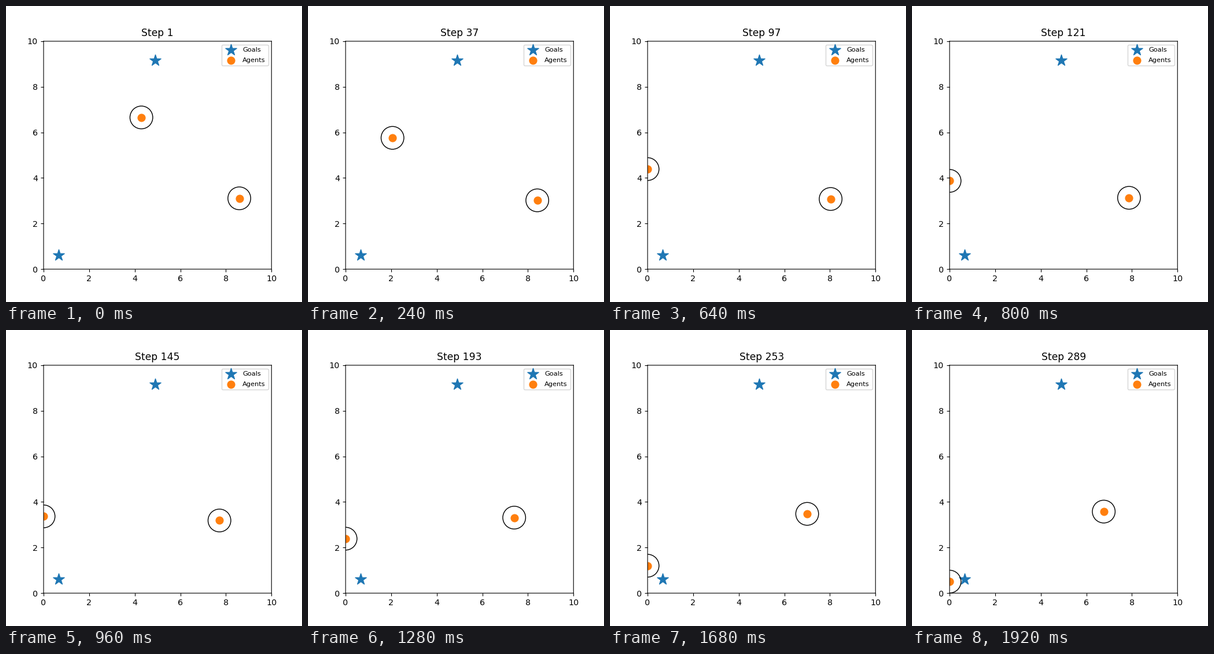
A matplotlib script for the animation above (2 s loop, 512x512 px).

```python
import numpy as np
import matplotlib.pyplot as plt
from matplotlib.animation import FuncAnimation
from matplotlib.patches import Circle

SIZE, SIDE = 512, 394.24
FRAMES, INTERVAL, STRIDE = 25, 80, 12


def drift(t, start, speed, kick, tau):
    """Steady motion plus an initial kick that fades with time constant tau."""
    return start + speed * t + kick * (1 - np.exp(-t / tau))


def positions(t):
    # The left agent runs into the wall and slides down along it
    left = max(0.0, 4.29 - 0.744 * t), drift(t, 6.656, -0.2233, -0.87, 10)
    right = drift(t, 8.587, -0.0793, 0.08, 2), drift(t, 3.107, 0.0335, -0.333, 3.6)
    return [left, right]


fig = plt.figure(figsize=(5, 5), dpi=SIZE / 5)
ax = fig.add_axes([65.02 / SIZE, 56.83 / SIZE, SIDE / SIZE, SIDE / SIZE])
ax.set(xlim=(0, 10), ylim=(0, 10))
for spine in ax.spines.values():
    spine.set_snap(False)

ax.scatter([4.905, 0.655], [9.16, 0.605], s=200, marker="*", label="Goals")
agents = ax.scatter(*zip(*positions(0)), s=80, label="Agents")
rings = [ax.add_patch(Circle(p, 0.5, fill=False)) for p in positions(0)]
title = ax.set_title("Step 1")
ax.legend(loc="upper right", fontsize=8, labelspacing=0.65)


def update(i):
    spots = positions(i)
    agents.set_offsets(spots)
    for ring, spot in zip(rings, spots):
        ring.center = spot
    title.set_text(f"Step {1 + STRIDE * i}")
    return [agents, title, *rings]


anim = FuncAnimation(fig, update, frames=FRAMES, interval=INTERVAL,
                     repeat=True, repeat_delay=0)
plt.show()
```
